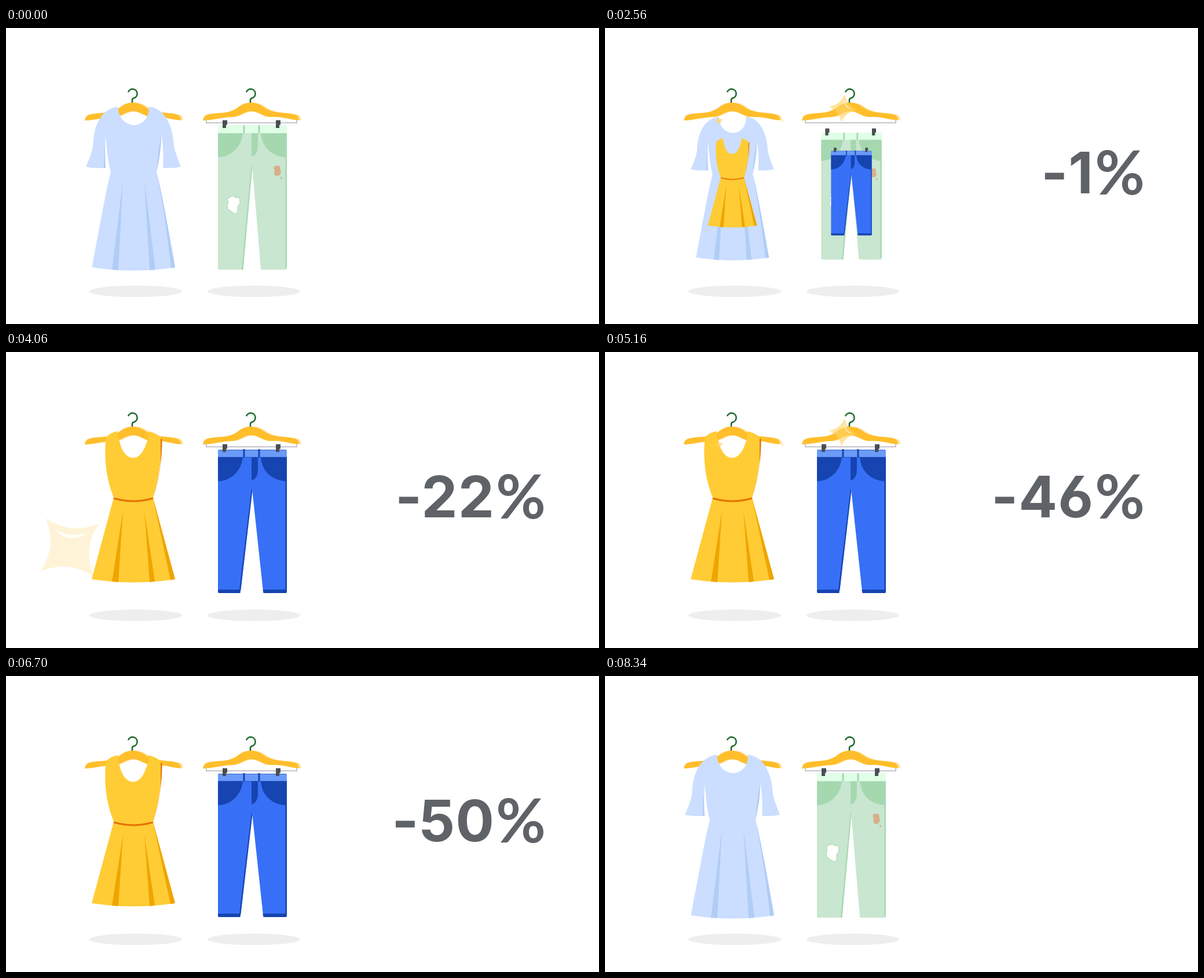
An HTML page that plays this animation: 1024x512 px, repeating every 8420 ms.

```html
<!DOCTYPE html>
<html lang="en">
<head>
<meta charset="utf-8">
<title>Wardrobe sale</title>
<style>
  html, body { margin: 0; width: 100%; height: 100%; overflow: hidden; background: #fff; }
  svg { display: block; width: 100vw; height: 100vh; }
  #label { fill: #5f6368; font-weight: 700; }
  #count { font: 700 99px Inter, sans-serif; letter-spacing: 1px; text-anchor: end; font-feature-settings: "cv03", "cv04"; }
  #unit { font: 700 105px Lato, sans-serif; text-anchor: middle; }
</style>
</head>
<body>
<svg viewBox="0 0 1024 512">
  <defs>
    <path id="wood" d="M136 160Q137 151 145 149.500C164 145 180 150 197 137Q207 129 218 129Q230 129 240 136C257 149 274 145 294 149.500Q302 151 302 159.500C286 159 272 152 252 154C240 154 232 144 219 144C206 144 200 153 187 154C168 154 154 159 136 160Z"/>
    <g id="hanger">
      <ellipse cx="224" cy="455.500" rx="80" ry="10" fill="#eee"/>
      <path d="M211 111A8 8 0 1 1 220 121.500Q218 122 218 125V130" fill="none" stroke="#1e6b2e" stroke-width="2.600"/>
      <use href="#wood" x="4" fill="#ffe4a8"/>
      <use href="#wood" fill="#ffbe2a"/>
    </g>
    <g id="clips" fill="#4a4e52">
      <path id="clip" d="M374 159.500h8v8h-2v5.500h-6z"/>
      <use href="#clip" x="92"/>
    </g>
    <!-- pockets, fly, belt loops and side seam -->
    <path id="seams" d="M366 182H409C406 208 387 223 366 223.500ZM440 182H485V415H482.500V223.500C461 222 442 208 440 182ZM424 182H435V205Q434 220 424 222ZM409.500 168h3v14h-3zM435.500 168h3v14h-3z"/>
    <g id="star">
      <path d="M0-1Q.23-.23 1 0Q.23.23 0 1Q-.23.23-1 0Q-.23-.23 0-1Z" fill="#ffd468"/>
      <path d="M0-.62Q.17-.17.62 0Q.04-.04 0-.62Z" fill="#fff" opacity=".9"/>
    </g>
  </defs>

  <use href="#hanger"/>
  <use href="#hanger" x="204"/>
  <path d="M346 158V164H502V159" fill="none" stroke="#c8c6cc" stroke-width="2"/>

  <g id="oldDress" fill="#cbdeff">
    <path d="M193 136C166 140 152 165 150.500 200Q150 213 138 240Q150 243 171 242C169 222 170 205 172.500 188C174 215 177 235 181 250C174 275 171 295 148.500 414Q220 425 292 414C271 295 267 275 260 250C263 225 266 205 268 184C272 205 272 225 271 242Q290 243 302 240Q291 213 290 203C287 163 272 139 247 136C247 152 240 167 221 168C203 167 194 152 193 136Z"/>
    <path fill="#b1cdf6" d="M202 263L194 419L183 418ZM239 263L258 418L248 419ZM260 250Q269 282 292 414L285 415.500Q273 310 260 250ZM268 184Q269 210 260 249Q262 215 268 184ZM172.500 188Q170 205 172 242H169Q168 215 172.500 188Z"/>
  </g>
  <g id="oldPants">
    <path fill="#c8e6d0" d="M366 168H485V416Q485 418 483 418H442Q440 418 440 416L425 236L409 418H368Q366 418 366 416Z"/>
    <path fill="#dfffe6" d="M366 168H485V182H366Z"/>
    <g fill="#a6d8b0">
      <use href="#seams"/>
      <path d="M424 236L407 418H409.500L425.500 240Z"/>
    </g>
    <path fill="#fff" stroke="#a6d8b0" d="M386 293L392 290.500L396 293L403.500 294L404 303L400 309L400 318L396 321.500L390 318L383 313L382 307L384 300L382 296Z"/>
    <path fill="#d8ae8a" d="M463 240L467 238L473 239L474 246L475 250L472 255L466 256L463 252L464 246L462 242ZM474 258l2-1l1 3l-2 2z"/>
    <use href="#clips"/>
  </g>

  <g id="newDress">
    <path fill="#ffcc35" d="M193 137Q180 139 172.500 148Q167 205 186 252L148 393Q220 404 292 393L254 252Q268 205 269.500 150Q262 141 246 137Q246.500 145 245 150C239 171 231 183 220 183C207 183 199 170 195 150Q192 143 193 137Z"/>
    <path fill="#efa500" d="M202 275L194 398L183 397ZM239 275L257 397L248 398ZM254 253L292 393L284 394.500Z"/>
    <path fill="#e57200" d="M267 150H269.500Q270 203 254 252Q266 210 267 188Z"/>
    <path fill="none" stroke="#e57200" stroke-width="3" d="M186 253Q220 263 254 253"/>
  </g>
  <g id="newPants">
    <path fill="#3770f6" d="M366 171H485V414H444L425 237L405 414H366Z"/>
    <path fill="#6b9bfa" d="M366 171Q366 169 368 169H483Q485 169 485 171V182H366Z"/>
    <g fill="#1644b0">
      <use href="#seams"/>
      <path d="M424 236L403 411H405.500L425.500 240ZM366 411H405L404.500 417H368Q366 417 366 415ZM443.500 411H485V415Q485 417 483 417H444.500Z"/>
    </g>
    <path fill="none" stroke="#1644b0" stroke-dasharray="2 1" d="M367 169.500H484M366 182H485"/>
    <use href="#clips"/>
  </g>

  <g id="label">
    <text id="count" x="844" y="286"></text>
    <text id="unit" x="889" y="288">%</text>
  </g>
  <g id="stars"></g>
</svg>
<script>
const LOOP = 8420, REPLAY = 2600;
const $ = id => document.getElementById(id);
const progress = (t, start, length) => Math.min(1, Math.max(0, (t - start) / length));
const backIn = p => 2.70158 * p ** 3 - 1.70158 * p ** 2;
const backOut = p => 1 - backIn(1 - p);
const cubicInOut = p => p < .5 ? 4 * p ** 3 : 1 - 4 * (1 - p) ** 3;

// x, y, final radius, start, lifetime, spin
const sparkles = [
  [411, 139, 50, 2100, 940, 80],
  [197, 160, 35, 2360, 1000, 70],
  [307, 161, 27, 2500, 1000, 70],
  [331, 298, 40, 2650, 1000, 70],
  [260, 268, 40, 2950, 1000, 70],
  [110, 338, 68, 3100, 1000, -70]
];
$('stars').innerHTML = '<use href="#star"/>'.repeat(sparkles.length);

function pose(id, x, y, scale, opacity) {
  $(id).setAttribute('transform', `translate(${x} ${y}) scale(${scale}) translate(${-x} ${-y})`);
  $(id).setAttribute('opacity', opacity);
}

function drawSparkle([x, y, radius, start, life, spin], node, t) {
  const age = t < start + REPLAY ? t - start : t - start - REPLAY;
  const p = age / life;
  const visible = p > 0 && p < 1;
  node.setAttribute('opacity', visible ? 1 - .77 * p : 0);
  if (visible) {
    node.setAttribute('transform', `translate(${x} ${y}) rotate(${spin * (p - .4)}) scale(${radius * p})`);
  }
}

function draw(t) {
  const reset = progress(t, 7780, 560);
  const shrink = reset ? 1 : 1 - backIn(progress(t, 2130, 600));
  const grow = backOut(progress(t, 2467, 600));
  const oldAlpha = t < 7780 ? 1 : reset;
  pose('oldDress', 220, 277, shrink, oldAlpha);
  pose('oldPants', 425.5, 276, shrink, oldAlpha);
  pose('newDress', 220, 268, grow, 1 - reset);
  pose('newPants', 425.5, 275, grow, 1 - reset);

  const percent = Math.round(50 * cubicInOut(progress(t, 1900, 4500)));
  $('count').textContent = percent ? '-' + percent : '0';
  $('label').setAttribute('opacity', progress(t, 730, 390) * (1 - reset));

  sparkles.forEach((s, i) => drawSparkle(s, $('stars').children[i], t));
}

const begin = performance.now();
function frame() {
  draw((performance.now() - begin) % LOOP);
  requestAnimationFrame(frame);
}
frame();
</script>
</body>
</html>
```
